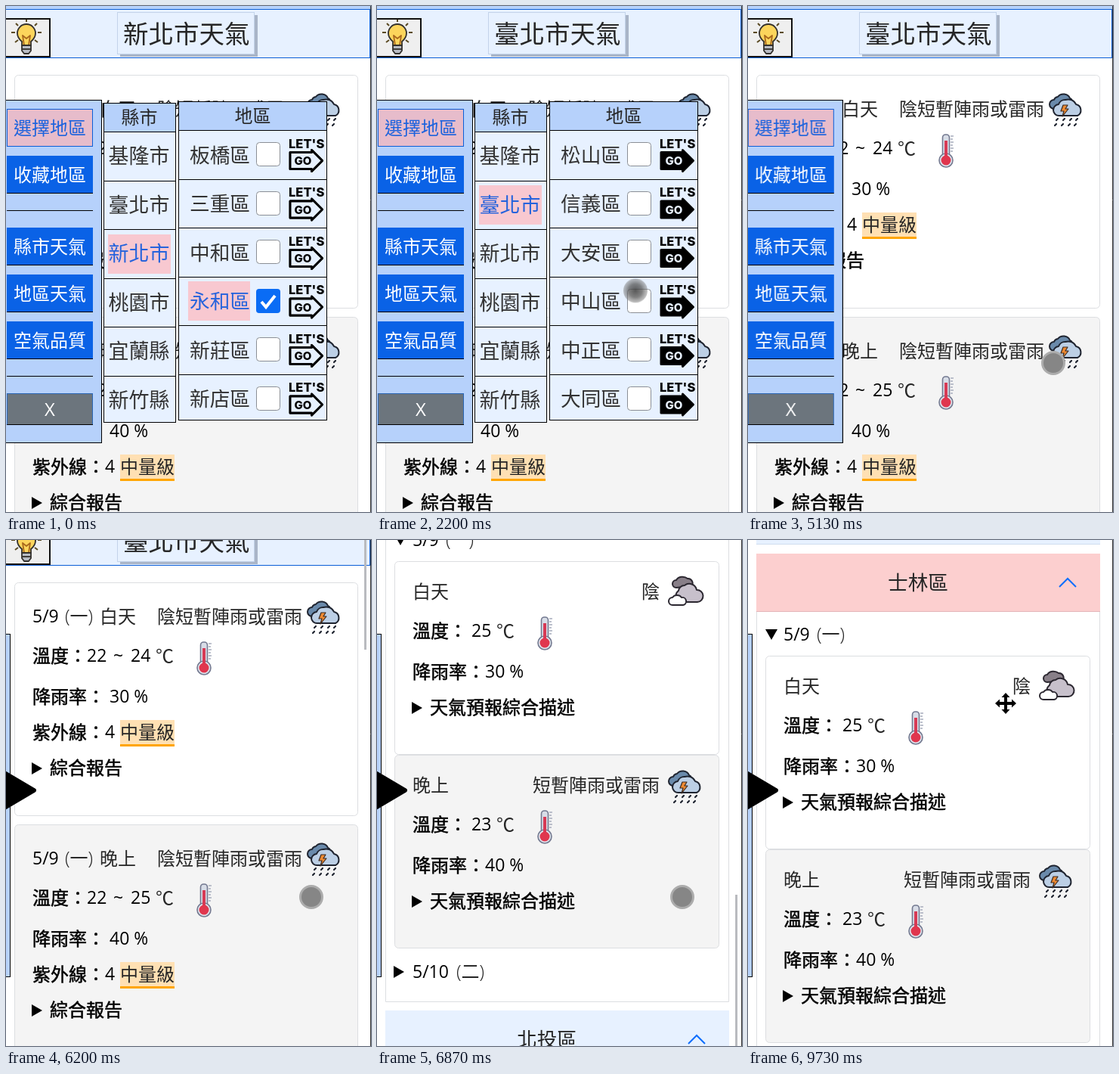
Write an HTML page that moves like this. It is 483 px wide and 669 px high and loops after 9790 ms.

```html
<!DOCTYPE html>
<html lang="zh-Hant">
<head>
<meta charset="utf-8">
<style>
html, body { margin: 0; width: 100%; height: 100%; overflow: hidden; background: #fff; }
svg { display: block; }
text { font-family: "Open Sans", "Noto Sans CJK TC", "Noto Sans CJK JP", sans-serif; font-weight: 300; white-space: pre; }
.n { font-weight: 400; }
.b { font-weight: 400; stroke: #000; stroke-width: .5px; }
.m { text-anchor: middle; }
.e { text-anchor: end; }
.go { font: 800 16.5px Inter, sans-serif; }

#page, #list, #side, #thumb, #cursor { animation: 9790ms linear infinite; }
.before, .after, .blink, #panels, #handle, #bar, .soft, .flat, .cross { animation: 9790ms step-end infinite; }
#page { animation-name: page; }
#list { animation-name: list; }
#side { animation-name: side; }
#thumb { animation-name: thumb; }
#cursor { animation-name: cursor; }
.before { animation-name: before; }
.after { animation-name: after; }
.blink { animation-name: blink; }
#panels { animation-name: panels; }
#handle { animation-name: handle; }
#bar { animation-name: bar; }
.soft { animation-name: soft; }
.flat { animation-name: flat; }
.cross { animation-name: cross; }

@keyframes page {
  0%, 63.25% { transform: translateY(0); }
  63.32% { transform: translateY(-35px); }
  63.34% { transform: translateY(-35px); animation-timing-function: cubic-bezier(.42, .1, .58, 1); }
  70.1%, 76.2% { transform: translateY(-1729px); animation-timing-function: ease-in-out; }
  78.3%, 100% { transform: translateY(-1604px); }
}
@keyframes thumb {
  0%, 63.34% { transform: translateY(-59px); animation-timing-function: cubic-bezier(.42, .1, .58, 1); }
  70.1%, 76.2% { transform: translateY(469px); animation-timing-function: ease-in-out; }
  78.3%, 100% { transform: translateY(432px); }
}
@keyframes bar {
  0% { opacity: 0; } 63.3% { opacity: 1; } 74.25% { opacity: .5; } 74.85% { opacity: 0; }
  76.3% { opacity: 1; } 83% { opacity: .5; } 83.6%, 100% { opacity: 0; }
}
@keyframes list {
  0%, 24.5% { transform: translateY(0); animation-timing-function: ease-in-out; }
  26.5%, 28.5% { transform: translateY(-125px); animation-timing-function: ease-in-out; }
  30.6%, 32.6% { transform: translateY(-250px); animation-timing-function: ease-in-out; }
  34.7%, 100% { transform: translateY(-375px); }
}
@keyframes side {
  0%, 52.3% { transform: translateX(0); animation-timing-function: ease; }
  57.9%, 100% { transform: translateX(-121px); }
}
@keyframes cursor {
  0%, 2.6% { transform: translate(510px, 700px); }
  2.75% { transform: translate(470px, 655px); animation-timing-function: ease-in-out; }
  8.1%, 10.2% { transform: translate(188px, 270px); animation-timing-function: ease-in-out; }
  13.5%, 20.3% { transform: translate(181px, 264px); animation-timing-function: ease-out; }
  22.46% { transform: translate(342px, 376px); }
  23.8%, 36% { transform: translate(340px, 395px); animation-timing-function: ease-in-out; }
  41.5%, 78.3% { transform: translate(404px, 472px); animation-timing-function: ease-in-out; }
  85.79% { transform: translate(193px, 49px); animation-timing-function: ease-in-out; }
  89.5% { transform: translate(165px, 24px); animation-timing-function: ease-in-out; }
  96%, 96.6% { transform: translate(328px, 209px); }
  97.3%, 99.37% { transform: translate(336px, 216px); }
  99.38%, 100% { transform: translate(341px, 216px); }
}
@keyframes blink {
  0% { opacity: 1; } 2.75% { opacity: 0; }
  10.82% { opacity: 1; } 11.5% { opacity: 0; } 12.25% { opacity: 1; } 12.95% { opacity: 0; }
  21.75% { opacity: 1; } 22.45% { opacity: 0; } 23.18% { opacity: 1; } 23.8% { opacity: 0; }
  32.68% { opacity: 1; } 33.4% { opacity: 0; } 34% { opacity: 1; } 34.7% { opacity: 0; }
  43.6% { opacity: 1; } 44.2% { opacity: 0; } 44.9% { opacity: 1; } 45.6%, 100% { opacity: 0; }
}
@keyframes before { 0% { opacity: 1; } 15%, 100% { opacity: 0; } }
@keyframes after { 0% { opacity: 0; } 15%, 100% { opacity: 1; } }
@keyframes panels { 0% { opacity: 1; } 52.4%, 100% { opacity: 0; } }
@keyframes handle { 0% { opacity: 0; } 57.2%, 100% { opacity: 1; } }
@keyframes soft { 0% { opacity: 1; } 52.4% { opacity: 0; } 78.4% { opacity: 1; } 99.38%, 100% { opacity: 0; } }
@keyframes flat { 0% { opacity: 0; } 52.4% { opacity: 1; } 78.4%, 100% { opacity: 0; } }
@keyframes cross { 0% { opacity: 0; } 99.38%, 100% { opacity: 1; } }
</style>
</head>
<body>
<svg id="stage" width="483" height="669" viewBox="0 0 483 669">
  <defs>
    <radialGradient id="dot">
      <stop offset="0" stop-color="#3c3c3c" stop-opacity=".85"/>
      <stop offset=".55" stop-color="#555" stop-opacity=".75"/>
      <stop offset="1" stop-color="#888" stop-opacity=".5"/>
    </radialGradient>
    <clipPath id="clip"><rect x="228" y="127" width="198" height="421"/></clipPath>

    <g id="storm" stroke="#1f2430" stroke-width="2" stroke-linejoin="round" stroke-linecap="round">
      <path d="M6 22a6 6 0 0 1 0-12a6 6 0 0 1 5-4a9 8 0 0 1 16 2a6 6 0 0 1 3 8L16 24Z" fill="#6a8aab"/>
      <path d="M13 31a7.5 7.5 0 0 1-1-15a9 9 0 0 1 9-6a11 10 0 0 1 14 6a8 8 0 0 1 2 15Z" fill="#bccfe5"/>
      <path d="M18 17h6l-3 5h4l-8 10l2-7h-4Z" fill="#ee8a32" stroke="#3a2a22" stroke-width="1.2"/>
      <path d="M11 35l-2 2M20 35l-2 2M29 35l-2 2M37 35l-2 2M9 42l-2 2M18 42l-2 2M27 42l-2 2M35 42l-2 2" stroke-width="2.2"/>
    </g>
    <g id="cloud" stroke="#2b2730" stroke-width="2" stroke-linejoin="round">
      <path d="M10 16a5 5 0 0 1 0-10a9 7 0 0 1 15-2a6 6 0 0 1 5 10Z" fill="#887f88"/>
      <path d="M14 35a9 9 0 0 1-1-15a8 8 0 0 1 8-7a10 10 0 0 1 16 6a8 8 0 0 1 1 16Z" fill="#c7c0cb"/>
      <path d="M5 39a5 5 0 0 1 0-10a7 6 0 0 1 12 0a5 5 0 0 1 2 10Z" fill="#fff"/>
    </g>
    <g id="thermo">
      <rect x="5.5" y="1" width="9" height="33" rx="4" fill="#d8dde7" stroke="#737990" stroke-width="1.6"/>
      <circle cx="10" cy="35" r="9" fill="#dfe4ec" stroke="#737990" stroke-width="1.6"/>
      <path d="M10 9V33" stroke="#d73a55" stroke-width="4"/>
      <circle cx="10" cy="35" r="6.5" fill="#e0364e"/>
      <path d="M16 3h4M16 7h3M16 11h4M16 15h3M16 19h4M16 23h3" stroke="#a8adbd" stroke-width="1.5"/>
    </g>
    <path id="arrow" d="M1.5-4H30V-7L44 7L30 21V18H1.5Z" stroke="#000" stroke-width="3" stroke-linejoin="round"/>
    <g id="solid"><use href="#arrow"/><text class="go" x="7" y="12.5" fill="#e7f1ff" style="font-size:15px">GO</text></g>
    <g id="hollow" fill="#e7f1ff"><use href="#arrow"/><text class="go" x="7" y="12.5" fill="#000" style="font-size:15px">GO</text></g>
  </defs>
  <g id="page"></g>
  <path d="M482.5 0V669" stroke="#333"/>
  <g id="bar"><rect id="thumb" x="474" width="3" height="204" fill="#b9bbbf"/></g>
  <g id="panels"></g>
  <g id="side"></g>
  <path id="handle" d="M-3 307.5L37 331L-3 354.5Z" stroke="#000" stroke-width="6" stroke-linejoin="round"/>
  <g id="cursor">
    <circle class="soft" r="16" fill="url(#dot)"/>
    <circle class="flat" r="14.5" fill="#868686" stroke="#acacac" stroke-width="3"/>
    <path class="cross" d="M0-14L5.5-8H2V-2H8V-5.5L14 0L8 5.5V2H2V8H5.5L0 14L-5.5 8H-2V2H-8V5.5L-14 0L-8-5.5V-2H-2V-8H-5.5Z" stroke="#fff" stroke-width="2" paint-order="stroke"/>
  </g>
</svg>
<script>
const $ = id => document.getElementById(id);
const text = (x, y, s, size = 24, cls = '', fill = cls == 'b' || cls == 'n' ? '#000' : '#262626') =>
  `<text x="${x}" y="${y}" font-size="${size}" class="${cls}" fill="${fill}">${s}</text>`;
const box = (x, y, w, h, fill, extra = '') =>
  `<rect x="${x}" y="${y}" width="${w}" height="${h}" fill="${fill}" ${extra}/>`;
const line = (x1, x2, y) => `<path d="M${x1} ${y}H${x2}" stroke="#000"/>`;
const use = (id, x, y, cls = '') => `<use href="#${id}" x="${x}" y="${y}" class="${cls}"/>`;
const move = (y, s) => `<g transform="translate(0 ${y})">${s}</g>`;
const right = (x, y) => `<path d="M${x} ${y - 8}L${x + 14} ${y}L${x} ${y + 8}Z"/>`;
const num = (x, y, s) => text(x, y, s, 23, 'n');
const border = 'stroke="#dcdee1" rx="5"';

const forecast = (y, fill, part, low, high, rain) => move(y,
  box(11.5, .5, 454, 308, fill, border) +
  num(35, 53, '5/9') + text(78, 53, '(一)') + text(124, 54, part) +
  text(392, 54, '陰短暫陣雨或雷雨', 24, 'e') + use('storm', 399, 23) +
  text(35, 106, '溫度：', 24, 'b') + num(107, 105, low) + num(142, 105, '~') + num(165, 105, high) +
  text(198, 106, '℃') + use('thermo', 252, 78) +
  text(35, 160, '降雨率：', 24, 'b') + num(137, 159, rain) +
  text(35, 207, '紫外線：', 24, 'b') + num(131, 206, '4') +
  box(151, 182, 72, 32, '#ffe0b3') + box(151, 214, 72, 3, '#ffa500') + text(151, 207, '中量級') +
  right(34, 246) + text(58, 254, '綜合報告', 24, 'b'));

const period = (y, fill, part, sky, icon, temp, rain) => move(y,
  box(23.5, .5, 429, 255, fill, border) +
  text(47, 49, part) + text(374, 49, sky, 24, 'e') + use(icon, 386, 19) +
  text(47, 101, '溫度：', 24, 'b') + num(125, 100, temp) + text(158, 101, '℃') + use('thermo', 212, 73) +
  text(47, 155, '降雨率：', 24, 'b') + num(143, 154, rain) +
  right(46, 194) + text(70, 202, '天氣預報綜合描述', 24, 'b'));

const district = (y, name, open, active) => move(y,
  box(11, 0, 455, 77, active ? '#fccfcf' : '#e7f1ff') +
  `<path d="M11 76.5H466" stroke="${active ? '#e3b4b8' : '#cfdcee'}"/>` +
  text(225, 48, name, 26.7, 'm') +
  `<path d="M412 ${open ? 44 : 34}l11 ${open ? -11 : 11}l11 ${open ? 11 : -11}" fill="none" stroke="#0d6efd" stroke-width="2"/>`);

const taipei = '松山 信義 大安 中山 中正 大同 萬華 文山 南港 內湖 士林 北投'.split(' ');
const newTaipei = '板橋 三重 中和 永和 新莊 新店'.split(' ');
const cities = '基隆市 臺北市 新北市 桃園市 宜蘭縣 新竹縣'.split(' ');

const bulb = `<g stroke="#33302c" stroke-width="1.8" stroke-linejoin="round">
  <path d="M21 52V47Q15 42 15 36A12 12 0 0 1 39 36Q39 42 33 47V52Z" fill="#fcd55c"/>
  <path d="M24 52L22 39L27 43L32 39L30 52" fill="none" stroke="#a9681c"/>
  <path d="M21 52H33V59L30 63H24L21 59Z" fill="#b8bcc4"/><path d="M21 57H33"/>
  <path d="M27 18V21M13 23l3 3M41 23l-3 3M7 35h5M42 35h5M12 48l4-3M42 48l-4-3" stroke="#5a4a22" stroke-width="2"/></g>`;

const header =
  box(0, 0, 482, 4, '#b6d1fb') + box(-1, 4.5, 482.5, 64, '#e7f1ff', 'stroke="#0b5ed7"') +
  box(-1, 17, 59, 50, '#efefef', 'stroke="#111" stroke-width="2"') + bulb +
  box(151, 12, 182, 55, '#a9b5c7') + box(147.5, 8.5, 181, 55, '#e7f1ff', 'stroke="#c3d3ea"') +
  ['新北市', '臺北市'].map((c, i) =>
    `<g class="${i ? 'after' : 'before'}">${text(155, 48.5, c + '天氣', 33.5)}</g>`).join('');

const detail = move(1604,
  `<path d="M11.5 95V735.5H465.5V95" fill="none" stroke="#dcdee1"/><path d="M23 118H39L31 132Z"/>` +
  num(47, 133, '5/9') + text(91, 133, '(一)') +
  period(153, '#fff', '白天', '陰', 'cloud', '25', '30 %') +
  period(409, '#f4f4f4', '晚上', '短暫陣雨或雷雨', 'storm', '23', '40 %') +
  right(22, 696) + num(47, 704, '5/10') + text(105, 704, '(二)'));

$('page').innerHTML = header +
  forecast(91, '#fff', '白天', '22', '24', '30 %') +
  forecast(411, '#f4f4f4', '晚上', '22', '25', '40 %') +
  taipei.map((d, i) => district(i < 11 ? 732 + 89 * i : 2351, d + '區', i > 9, i == 10)).join('') + detail;

const cityRows = (active, cls) => `<g class="${cls}">` + cities.map((c, i) => {
  const y = 198 + 64.5 * i, on = i == active;
  return (on ? box(135, Math.floor(y - 25), 83, 52, '#f8c8d0') : '') +
    text(176, y + 10, c, 27, 'm', on ? '#2563dc' : '#333');
}).join('') + '</g>';

const check = (y, on) => on
  ? box(331, y - 16, 32, 32, '#0a6cf5', 'rx="4"') + `<path d="M338 ${y + 1}l6 7l12-15" fill="none" stroke="#fff" stroke-width="4"/>`
  : box(331.5, y - 15.5, 31, 31, '#fff', 'rx="4" stroke="#8b8f95"');

const areaRows = (names, active, cls) => `<g class="${cls}">` + names.map((n, i) => {
  const y = 196.5 + 64.5 * i, on = i == active;
  return box(228, y - 32, 197, 64.5, '#e7f1ff') + line(228, 425, Math.floor(y - 32) + .5) +
    (on ? box(241, y - 26, 82, 52, '#f8c8d0') : '') +
    text(243, y + 10, n + '區', 26.7, '', on ? '#2563dc' : '#333') + check(Math.floor(y), on) +
    `<text class="go" x="374" y="${y - 9}">LET'S</text>` +
    use('solid', 374.5, y + 1) + use('hollow', 374.5, y + 1, 'blink');
}).join('') + '</g>';

$('panels').innerHTML =
  box(129.5, 128.5, 95, 422, '#e7f1ff', 'stroke="#000"') + box(130, 129, 94, 37, '#b6d1fb') +
  cities.map((c, i) => line(129, 224, Math.floor(166.5 + 64.5 * i) + .5)).join('') +
  text(176.5, 156, '縣市', 24, 'm') + cityRows(2, 'before') + cityRows(1, 'after') +
  box(228.5, 126.5, 196, 421, '#e7f1ff') +
  `<g clip-path="url(#clip)"><g id="list">${box(228, 126, 197, 39, '#b6d1fb') + text(326.5, 154, '地區', 24, 'm') +
    areaRows(newTaipei, 3, 'before') + areaRows(taipei, -1, 'after')}</g></g>` +
  box(228.5, 126.5, 196, 421, 'none', 'stroke="#000"');

const button = (y, h, s, fill, ink, edge, cls = 'm') =>
  box(1.5, y + .5, 113, h - 1, fill, `stroke="${edge}"`) + (ink == '#fff' ? line(1, 115, y + h - .5) : '') +
  text(58, y + h / 2 + 8.5, s, 24, cls, ink);

$('side').innerHTML = box(-1, 124.5, 127.5, 453, '#b6d1fb', 'stroke="#000"') +
  button(136, 50, '選擇地區', '#e7bccb', '#1b62dd', '#0b5ed7') +
  [[198, '收藏地區'], [293, '縣市天氣'], [355, '地區天氣'], [417, '空氣品質']]
    .map(([y, s]) => button(y, 50, s, '#0a62e6', '#fff', '#0a62e6')).join('') +
  line(1, 115, 270.5) + line(1, 115, 489.5) + button(512, 42, 'X', '#6c757d', '#fff', '#2b66b5', 'm n');
</script>
</body>
</html>
```
